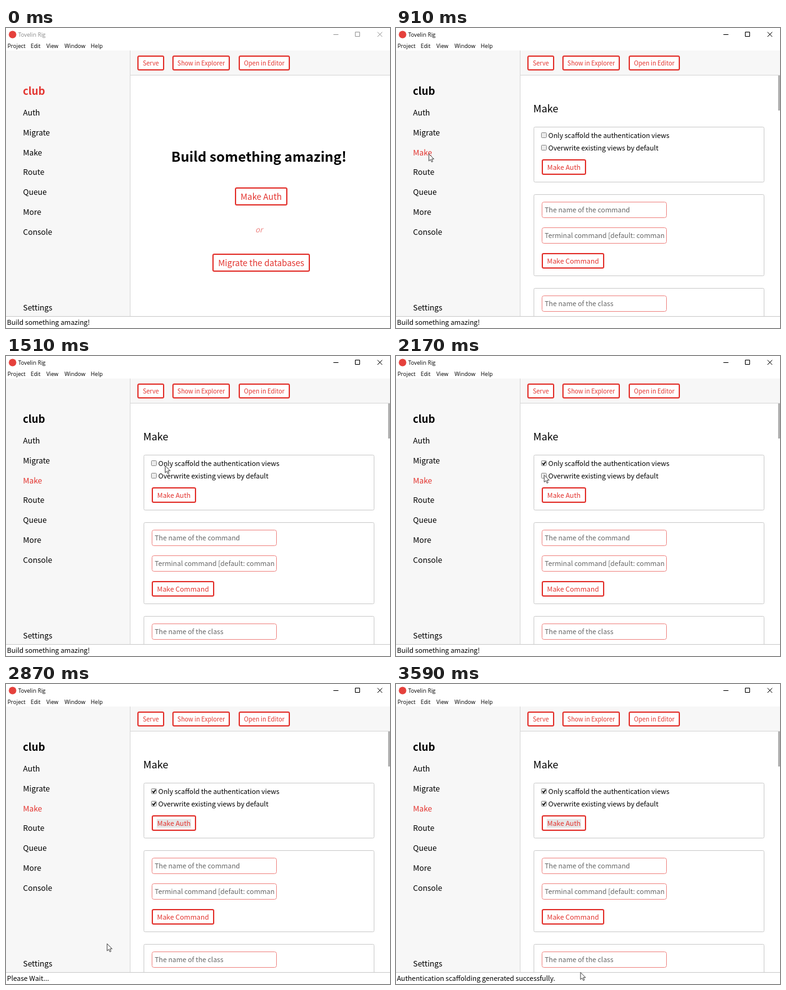
Write an HTML page that moves like this. It is 614 by 480 pixels and loops after 3.65 s.

```html
<!DOCTYPE html>
<html lang="en">
<head>
<meta charset="utf-8">
<title>Desktop tool demo</title>
<style>
  html, body { margin: 0; width: 100%; height: 100%; overflow: hidden; background: #fff; }
  svg { display: block; width: 100vw; height: 100vh; }
  text { font: 10.9px "Noto Sans CJK JP", "Noto Sans CJK SC", "Noto Sans CJK", sans-serif; white-space: pre; }
  .menu text { font: 8.9px "Open Sans", "Noto Sans", sans-serif; }
  .nav text { font-size: 12.35px; }
  .nav .project { font-size: 16.7px; font-weight: 700; }
  .button rect { fill: #fff; stroke: #e3342f; stroke-width: 2; }
  .button text { fill: #e3342f; text-anchor: middle; }
  .card { fill: #fff; stroke: #ccc; }
  .input rect { fill: #fff; stroke: #ef8986; }
  .input text { fill: #666; }
  .box rect { fill: #ececec; stroke: #8e8e8e; }
  .box path { fill: none; stroke: #111; stroke-width: 1.7; }
</style>
</head>
<body>
<svg id="stage" viewBox="0 0 614 480"></svg>
<script>
const RED = '#e3342f', LOOP = 3650, STEP = 30;
const OPEN_PAGE = 780, CHECK_FIRST = 1830, CHECK_SECOND = 2200, SUBMIT = 2430, DONE = 2950;

// Pointer path: time, x, y
const path = [
  [30, 292, 241], [400, 58, 236], [570, 64, 209], [750, 54, 201], [910, 52, 201],
  [1110, 52, 201], [1450, 254, 170], [1510, 254, 176], [1640, 254, 176],
  [1760, 236, 171], [1930, 236, 172], [2090, 236, 190], [2230, 237, 190],
  [2420, 270, 222], [2500, 270, 222], [2600, 212, 293], [2720, 190, 371],
  [3000, 128, 466], [3140, 138, 462], [3260, 195, 461], [3590, 301, 461], [LOOP, 301, 461]
];

const text = (x, y, label, attrs = '') => `<text x="${x}" y="${y}" ${attrs}>${label}</text>`;
const rect = (x, y, w, h, attrs = '') => `<rect x="${x}" y="${y}" width="${w}" height="${h}" ${attrs}/>`;
const button = (x, y, w, h, label, size, id = '') => `<g class="button">
  ${rect(x + 1, y + 1, w - 2, h - 2, 'rx="2"')}
  ${id && rect(x + 8, y + 6, w - 16, h - 11, `id="${id}" style="fill:#e6e6e6;stroke:none"`)}
  ${text(x + w / 2, y + h / 2 + size * 0.4, label, `style="font-size:${size}px"`)}</g>`;
const input = (y, label) => `<g class="input">
  ${rect(233.5, y + .5, 199, 25, 'rx="3"')}${text(237.8, y + 17, label)}</g>`;
const checkbox = (y, label, id) => `<g class="box">
  ${rect(232.5, y + .5, 8, 8, 'rx="1"')}
  <path id="${id}" d="M234 ${y + 4.5}l2 2.3 3.4-4.8"/>
  ${text(243.6, y + 9, label)}</g>`;
const card = (y, h) => rect(220.5, y + .5, 368, h, 'class="card" rx="2"');

const menu = [['Project', 3], ['Edit', 40], ['View', 65], ['Window', 94], ['Help', 136]];
const links = ['Auth', 'Migrate', 'Make', 'Route', 'Queue', 'More', 'Console'];
const $ = id => document.getElementById(id);

$('stage').innerHTML = `
  ${rect(0, 0, 614, 480, 'fill="#fff"')}
  <circle cx="10.5" cy="10.5" r="6" fill="#e5413c"/>
  <g class="menu">
    ${text(19.5, 14, 'Tovelin Rig', 'id="title"')}
    ${menu.map(([label, x]) => text(x - .5, 32, label)).join('')}
  </g>
  <path id="controls" fill="none" d="M523.5 10.5h8M558.5 6.5h7v7h-7zM594 6.5l7.5 7.5m0-7.5l-7.5 7.5"/>
  ${rect(0, 36, 614, 40, 'fill="#f7f7f7"')}
  ${rect(0, 36, 198, 425, 'fill="#f7f7f7"')}
  <path d="M198.5 36v425M199 75.5h415" stroke="#d8d8d8"/>
  <g class="nav">
    ${text(27, 107, 'club', 'id="project" class="project"')}
    ${links.map((label, i) => text(27.3, 140 + i * 31.8, label, `id="${label}"`)).join('')}
    ${text(27.3, 452, 'Settings')}
  </g>
  ${button(210, 44, 43, 24, 'Serve', 9.7)}
  ${button(266, 44, 92, 24, 'Show in Explorer', 9.7)}
  ${button(372, 44, 82, 24, 'Open in Editor', 9.7)}
  <g id="home">
    ${text(404.5, 214, 'Build something amazing!', 'text-anchor="middle" style="font-size:21.8px;font-weight:700"')}
    ${button(366, 255, 84, 29, 'Make Auth', 13.5)}
    ${text(404.5, 327, 'or', 'text-anchor="middle" fill="#ee8582" style="font-size:12px;font-style:italic"')}
    ${button(330, 361, 156, 29, 'Migrate the databases', 13.5)}
  </g>
  <g id="make">
    ${text(219.6, 135, 'Make', 'style="font-size:16.2px"')}
    ${card(158, 88)}
    ${checkbox(167, 'Only scaffold the authentication views', 'first')}
    ${checkbox(187, 'Overwrite existing views by default', 'second')}
    ${button(233, 210, 71, 25, 'Make Auth', 10.95, 'focus')}
    ${card(266, 130)}
    ${input(278, 'The name of the command')}
    ${input(319, 'Terminal command [default: comman')}
    ${button(233, 360, 100, 25, 'Make Command', 10.95)}
    ${card(416, 80)}
    ${input(428, 'The name of the class')}
    ${rect(611, 76, 3, 56, 'fill="#b1b1b1"')}
  </g>
  ${rect(0, 461, 614, 19, 'fill="#fff"')}
  <path d="M0 461.5h614" stroke="#ccc"/>
  ${text(1.5, 475, '', 'id="status"')}
  <path id="pointer" d="M.5 .5v11.3l2.6-2.4 1.8 4 1.8-.8-1.8-3.9h3.6z" fill="#fff" stroke="#333" stroke-width=".9"/>`;

const show = (id, on) => $(id).setAttribute('visibility', on ? 'visible' : 'hidden');
const paint = (id, color) => $(id).setAttribute('fill', color);

function pointerAt(t) {
  const i = Math.max(1, path.findIndex(p => p[0] > t));
  const [t0, x0, y0] = path[i - 1], [t1, x1, y1] = path[i];
  const k = (t - t0) / (t1 - t0);
  return [x0 + (x1 - x0) * k, y0 + (y1 - y0) * k];
}

function draw(now) {
  const t = Math.floor(now % LOOP / STEP) * STEP;
  const [x, y] = pointerAt(t);
  const onMake = t >= OPEN_PAGE;
  const over = (right, top) => t >= STEP && x > 27 && x < right && y > top && y < top + 18;

  show('home', !onMake);
  show('make', onMake);
  show('first', t >= CHECK_FIRST);
  show('second', t >= CHECK_SECOND);
  show('focus', t >= SUBMIT);
  show('pointer', t >= STEP);
  $('pointer').setAttribute('transform', `translate(${x} ${y})`);

  paint('project', onMake ? '#000' : RED);
  paint('Make', onMake || over(59, 190) ? RED : '#000');
  paint('Route', over(62, 222) ? RED : '#000');
  paint('title', onMake ? '#000' : '#888');
  $('controls').setAttribute('stroke', onMake ? '#000' : '#999');
  $('status').textContent = t < SUBMIT ? 'Build something amazing!'
    : t < DONE ? 'Please Wait...' : 'Authentication scaffolding generated successfully.';
  requestAnimationFrame(frame);
}

const start = performance.now();
function frame() { draw(performance.now() - start); }
frame();
</script>
</body>
</html>
```
